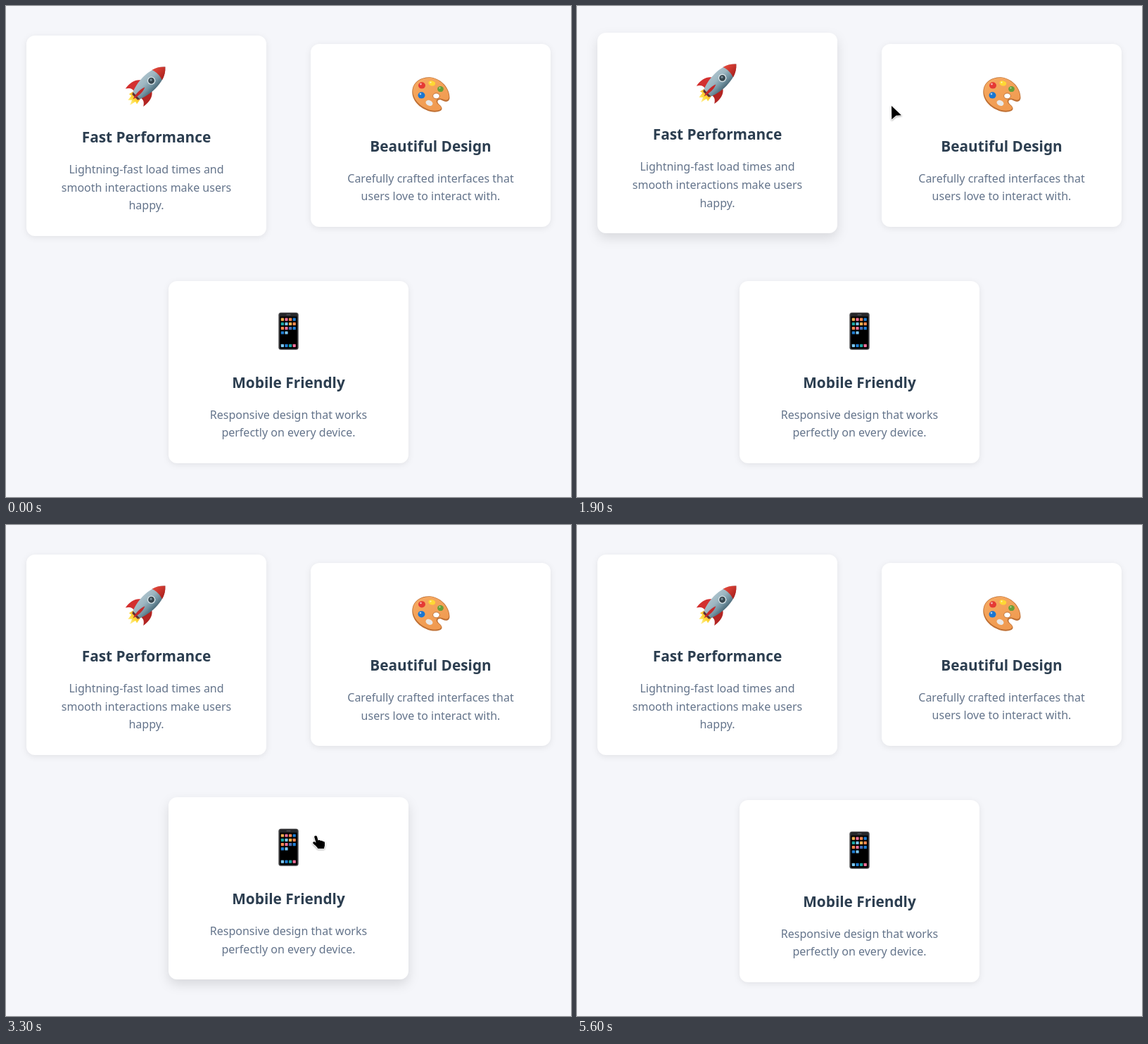
An HTML page that plays this animation: 803 by 698 pixels, repeating every 5.8 s.

```html
<!DOCTYPE html>
<html lang="en">
<head>
<meta charset="utf-8">
<title>Feature cards</title>
<style>
  html, body { margin: 0; width: 100%; height: 100%; overflow: hidden; background: #f5f6fa; }
  svg { display: block; }
  text { font-family: "Noto Sans", sans-serif; font-size: 16px; fill: #64748b; text-anchor: middle; }
  .title { font-size: 20.8px; font-weight: 700; fill: #2c3e50; }
  #cursor { filter: drop-shadow(.5px 1px 1px rgba(0, 0, 0, .35)); }
  #cursor path { fill: #000; stroke: #fff; stroke-width: 1.6; stroke-linejoin: round; paint-order: stroke; }
</style>
</head>
<body>
<svg id="stage" width="803" height="698" viewBox="0 0 803 698">
  <defs>
    <linearGradient id="hull">
      <stop offset="0" stop-color="#a9c0ca"/><stop offset=".35" stop-color="#9db6c1"/>
      <stop offset=".7" stop-color="#7394a2"/><stop offset="1" stop-color="#4c6a78"/>
    </linearGradient>
    <linearGradient id="red">
      <stop offset="0" stop-color="#e64a3d"/><stop offset="1" stop-color="#a81f1c"/>
    </linearGradient>
    <linearGradient id="flame" x2="0" y2="1">
      <stop offset="0" stop-color="#fb9b2c"/><stop offset=".45" stop-color="#fdd835"/><stop offset="1" stop-color="#fff19a"/>
    </linearGradient>
    <linearGradient id="wood" x2=".5" y2="1">
      <stop offset="0" stop-color="#f6aa62"/><stop offset="1" stop-color="#f09a50"/>
    </linearGradient>

    <g id="rocket" transform="rotate(45)">
      <path d="M-7 18L-9 26L-5 25L-4 33L0 29L3 36L5 27L9 28L7 18Z" fill="url(#flame)"/>
      <path id="fin" d="M-11 0C-17 4 -20 12 -18 24C-14 18 -11 17 -6 18Z" fill="#d3302f"/>
      <path d="M11 0C17 4 20 12 18 24C14 18 11 17 6 18Z" fill="#b32422"/>
      <path d="M0-38C9-30 12-18 12-6C12 6 9 15 7 20H-7C-9 15 -12 6 -12-6C-12-18 -9-30 0-38Z" fill="url(#hull)"/>
      <path d="M0-38C5.500-33 8.500-28 10.200-21.500C4-24 -4-24 -10.200-21.500C-8.500-28 -5.500-33 0-38Z" fill="url(#red)"/>
      <path d="M-7 20H7L5.500 23H-5.500Z" fill="#5a3038"/>
      <path d="M0 3C2.800 9 2.800 18 0 27C-2.800 18 -2.800 9 0 3Z" fill="#c62828"/>
      <circle cy="-10" r="5.800" fill="#d7e2e6"/>
      <circle cy="-10" r="4.400" fill="#37474f"/>
      <circle cx="-1.200" cy="-10.500" r="1.600" fill="#78909c"/>
    </g>

    <g id="palette">
      <path id="board" d="M-26-7C-24-20 -11-26 1-24.500C16-22 27-9 27 4C27 10 22 11 17 8.500C13 6 9 7 10 11C11 14 15 15 16 19C17 24 8 25.500 0 24C-16 20 -28 7 -26-7Z" fill="#bf7034"/>
      <path d="M-25-8C-23-19.500 -11-25 1-24C15-21.500 25.500-9 26 2.500C26 8 22 8.500 17.500 6.500C12 4 7 6 8.500 11C9.500 14 14 15 15 18.500C15.500 22.500 7 23.500 0 22C-15 18 -27 5 -25-8Z" fill="url(#wood)"/>
      <ellipse cx="8" cy="1.800" rx="4.800" ry="4" fill="#fff" stroke="#bf7034"/>
      <ellipse cx="-12.500" cy="-13.200" rx="5" ry="4.600" fill="#e53935"/>
      <ellipse cx="1.800" cy="-16.200" rx="5" ry="3.600" fill="#fdd835" transform="rotate(14 1.800 -16.200)"/>
      <ellipse cx="14" cy="-8" rx="4.400" ry="4" fill="#689f38"/>
      <ellipse cx="-13" cy=".8" rx="5" ry="4.600" fill="#1976d2"/>
      <ellipse cx="-2" cy="11.800" rx="5.200" ry="3.800" fill="#e8e8e8" transform="rotate(25 -2 11.800)"/>
      <g fill="#fff" opacity=".65">
        <circle cx="-14" cy="-15" r="1.300"/><circle cx="0" cy="-17.500" r="1.100"/>
        <circle cx="13" cy="-9.500" r="1"/><circle cx="-14.500" cy="-1" r="1.300"/>
      </g>
    </g>

    <g id="phone">
      <rect x="-14.200" y="-26.500" width="28.400" height="53" rx="3.500" fill="#4a4a4c"/>
      <rect x="-12.800" y="-25.500" width="25.600" height="51" rx="2.500" fill="#26272a"/>
      <rect x="-12.200" y="-20.800" width="24.400" height="45.500" fill="#000"/>
      <rect x="-3" y="-24" width="6" height="1.200" rx=".6" fill="#55575a"/>
    </g>
  </defs>

  <g id="cards"></g>
  <g id="cursor">
    <path id="arrow" d="M0 0L14 13.300L6.500 13.800L.3 19.300Z"/>
    <path id="hand" d="M-1.800 1.500C-2-.4 1.300-1 2 1L3.600 6.500C5 5.600 6.600 6 7 7C8.300 6.400 9.800 6.800 10.200 7.800C11.600 7.400 13 8.200 13 9.800V13.500C13 15 12 16 12 18H3.200C2.500 16 -1.500 13 -3.600 10.600C-4.600 9 -2.600 7.600 -1 8.600L.6 9.800Z"/>
  </g>
</svg>
<script>
const LOOP = 5800, STEP = 100, HOVER = 300;
const $ = id => document.getElementById(id);

function make(tag, attrs, parent, text) {
  const el = document.createElementNS("http://www.w3.org/2000/svg", tag);
  for (const k in attrs) el.setAttribute(k, attrs[k]);
  if (text) el.textContent = text;
  parent.append(el);
  return el;
}

const cards = [
  { x: 29, top: 41.6, bottom: 327.2, icon: "rocket", title: "Fast Performance", on: 755, off: 1810,
    lines: ["Lightning-fast load times and", "smooth interactions make users", "happy."] },
  { x: 433, top: 54.4, bottom: 314.4, icon: "palette", title: "Beautiful Design", on: 1965, off: 3030,
    lines: ["Carefully crafted interfaces that", "users love to interact with."] },
  { x: 231, top: 390.6, bottom: 650.4, icon: "phone", title: "Mobile Friendly", on: 3210, off: 4240,
    lines: ["Responsive design that works", "perfectly on every device."] }
];

// Cursor tip: time, x, y
const path = [
  [600, 120, 10], [700, 185, 30], [800, 222, 70], [900, 239, 98], [1000, 262, 70], [1100, 276, 56],
  [1500, 276, 56], [1700, 325, 80], [1800, 366, 108], [1900, 447, 142], [2000, 482, 144], [2300, 502, 145],
  [2700, 502, 145], [2900, 492, 205], [3000, 478, 290], [3200, 452, 385], [3300, 440, 442], [3500, 434, 456],
  [3800, 431, 459], [3900, 431, 459], [4000, 427.5, 451], [4200, 416, 393], [4300, 406, 300], [4400, 400, 205],
  [4500, 397, 131], [4600, 394, 72], [4800, 394, 72], [4900, 388, 58], [5000, 368, 38], [5100, 300, 24],
  [5200, 190, 8], [5300, 95, -3], [5400, 53, -8], [5500, 45, -13]
];

// Four app icons per row; the fifth row is the dock
const apps = ["ypob", "tlyo", "opTb", "bl", "lbtp"];
const tints = { y: "#f4b04f", o: "#ff8a50", p: "#f2719b", b: "#1e7fd6", t: "#1ba8a4", T: "#4a6fb5", l: "#7cc8f5" };
apps.forEach((row, r) => [...row].forEach((c, i) =>
  make("rect", { x: -10.7 + i * 5.6, y: r < 4 ? -18.8 + r * 6.3 : 18.4, width: 4.2, height: 4.2, rx: .6, fill: tints[c] }, $("phone"))));

for (const c of cards) {
  const y = Math.round(c.top), mid = c.x + 170.5;
  const box = { x: c.x, y, width: 341, height: Math.round(c.bottom) - y, rx: 12 };
  const base = Math.floor(c.top + 196.8);
  c.g = make("g", {}, $("cards"));
  c.shadow = make("rect", box, c.g);
  make("rect", { ...box, fill: "#fff" }, c.g);
  make("use", { href: "#" + c.icon, transform: `translate(${mid} ${c.top + 71.7})` }, c.g);
  make("text", { class: "title", x: mid, y: Math.floor(c.top + 152.6) }, c.g, c.title);
  c.rows = c.lines.map((s, i) => ({ y: base + (c.icon === "rocket" ? .4 : .2) + i * 25.6, el: make("text", { x: mid }, c.g, s) }));
}

// CSS "ease": cubic-bezier(.25, .1, .25, 1)
function ease(p) {
  if (p <= 0) return 0;
  if (p >= 1) return 1;
  const bez = (u, a, b) => 3 * u * (1 - u) ** 2 * a + 3 * u * u * (1 - u) * b + u ** 3;
  let lo = 0, hi = 1;
  for (let i = 0; i < 24; i++) {
    const m = (lo + hi) / 2;
    if (bez(m, .25, .25) < p) lo = m; else hi = m;
  }
  return bez(lo, .1, 1);
}

const mix = (a, b, k) => a + (b - a) * k;

function tipAt(t) {
  const i = path.findIndex(p => p[0] >= t);
  if (i < 1) return path[0].slice(1);
  const a = path[i - 1], b = path[i], k = (t - a[0]) / (b[0] - a[0]);
  return [mix(a[1], b[1], k), mix(a[2], b[2], k)];
}

function draw(t) {
  for (const c of cards) {
    const k = ease((t - c.on) / HOVER) - ease((t - c.off) / HOVER);
    c.g.setAttribute("transform", `translate(0 ${-8 * k})`);
    c.shadow.setAttribute("transform", `translate(0 ${mix(2, 12, k)})`);
    c.shadow.setAttribute("fill-opacity", mix(.08, .15, k));
    c.shadow.style.filter = `blur(${mix(4, 12, k)}px)`;
    // Resting text sits on whole pixels
    for (const r of c.rows) r.el.setAttribute("y", k ? r.y : Math.floor(r.y));
  }
  const shown = t >= 600 && t <= 5500;
  $("cursor").style.display = shown ? "" : "none";
  if (!shown) return;
  const over = cards.some(c => t >= c.on && t < c.off);
  $("arrow").style.display = over ? "none" : "";
  $("hand").style.display = over ? "" : "none";
  $("cursor").setAttribute("transform", `translate(${tipAt(t).join(" ")})`);
}

const start = performance.now();
function tick() {
  const t = (performance.now() - start) % LOOP;
  draw(Math.floor(t / STEP) * STEP);
  requestAnimationFrame(tick);
}
tick();
</script>
</body>
</html>
```
